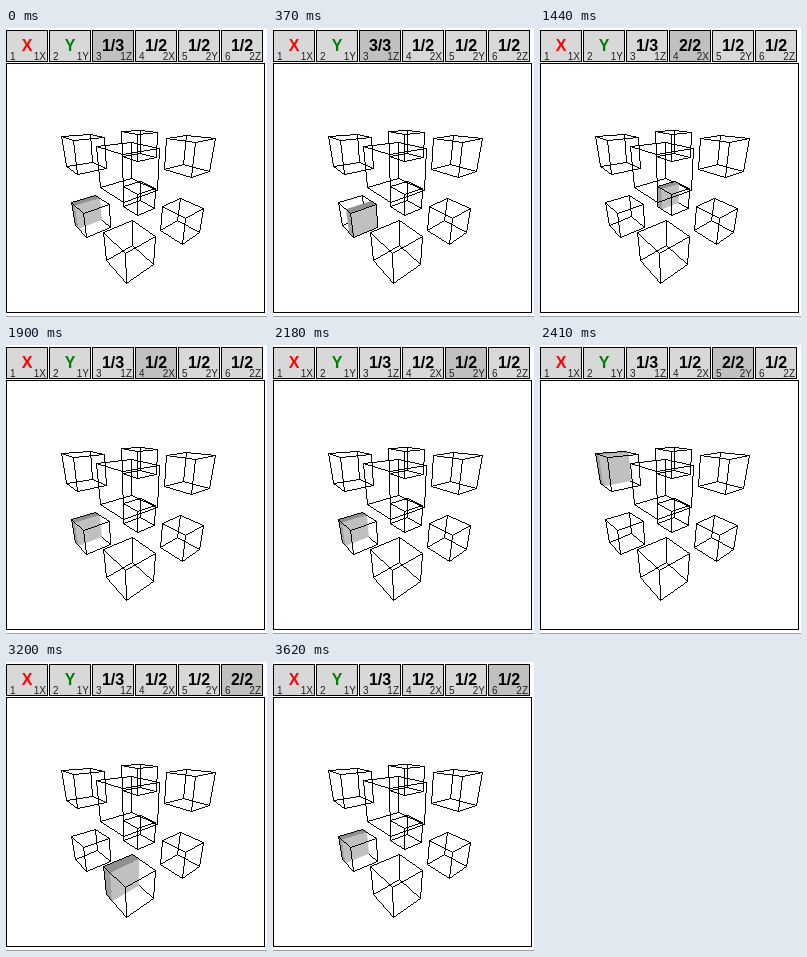
Animation, 261 px wide and 289 px high, one loop 3760 ms. Source, as an HTML page with a canvas:

```html
<!DOCTYPE html>
<html lang="en">
<head>
<meta charset="utf-8">
<style>
  html, body { margin: 0; width: 100%; height: 100%; overflow: hidden; background: #fff; }
  canvas, svg { position: absolute; left: 0; top: 0; width: 261px; height: 289px; }
  text { font-family: Arial, "Liberation Sans", sans-serif; }
  .main { font-size: 16px; font-weight: bold; text-anchor: middle; }
  .small { font-size: 10px; fill: #222; }
  .end { text-anchor: end; }
</style>
</head>
<body>
<canvas width="261" height="289"></canvas>
<svg viewBox="0 0 261 289"></svg>
<script>
const LOOP = 3760;
// time, active button, slice, block offset on each axis
const STEPS = [
  [0, 2, 0, 0, 0, 0], [190, 2, 1, 0, 0, 0], [370, 2, 2, 0, 0, 0],
  [780, 2, 1, 0, 0, 0], [960, 2, 0, 0, 0, 0], [1250, 3, 0, 0, 0, 0],
  [1440, 3, 0, 1, 0, 0], [1900, 3, 0, 0, 0, 0], [2180, 4, 0, 0, 0, 0],
  [2410, 4, 0, 0, 1, 0], [2780, 4, 0, 0, 0, 0], [3070, 5, 0, 0, 0, 0],
  [3200, 5, 0, 0, 0, 1], [3620, 5, 0, 0, 0, 0]
];
const LABELS = ['1X', '1Y', '1Z', '2X', '2Y', '2Z'];
const ctx = document.querySelector('canvas').getContext('2d');
const svg = document.querySelector('svg');

function add(tag, attrs, text = '') {
  const el = document.createElementNS('http://www.w3.org/2000/svg', tag);
  for (const key in attrs) el.setAttribute(key, attrs[key]);
  el.textContent = text;
  return svg.appendChild(el);
}

const buttons = LABELS.map((label, i) => {
  const x = i * 43;
  const box = add('rect', { x: x + .5, y: 2.5, width: 41, height: 31, stroke: '#000' });
  const value = add('text', { x: x + 21, y: 23, class: 'main', fill: ['#f00', '#008000'][i] || '#000' }, 'XY'[i]);
  add('text', { x: x + 4, y: 32, class: 'small' }, i + 1);
  add('text', { x: x + 40, y: 32, class: 'small end' }, label);
  return { box, value };
});
add('rect', { x: .5, y: 35.5, width: 258, height: 249, fill: 'none', stroke: '#000' });
add('rect', { x: 0, y: 288, width: 261, height: 1, fill: '#a0a0a0' });

// camera
const AZ = .685, PITCH = .4, DIST = 5.25, FOCAL = 180, HALF = .425;

function project(x, y, z) {
  const right = x * Math.cos(AZ) + z * Math.sin(AZ);
  const near = z * Math.cos(AZ) - x * Math.sin(AZ);
  const up = y * Math.cos(PITCH) - near * Math.sin(PITCH);
  const k = FOCAL / (DIST - near * Math.cos(PITCH) - y * Math.sin(PITCH));
  return [129.3 + right * k, 160 - up * k];
}

// p runs from 0 to 1 inside the block
const corner = (block, p) => project(...p.map((v, i) => block[i] * 2 - 1 + (v * 2 - 1) * HALF));

function line(a, b) {
  const [x, y] = a.map(Math.floor);
  const dx = Math.floor(b[0]) - x, dy = Math.floor(b[1]) - y;
  const n = Math.max(Math.abs(dx), Math.abs(dy));
  for (let i = 0; i <= n; i++) {
    ctx.fillRect(Math.round(x + dx * i / n), Math.round(y + dy * i / n), 1, 1);
  }
}

function face(block, color, points) {
  ctx.fillStyle = color;
  ctx.beginPath();
  points.forEach(p => ctx.lineTo(...corner(block, p)));
  ctx.fill();
}

function slab(block, slice) {
  const a = slice / 3, b = a + 1 / 3;
  face(block, '#c0c0c0', [[0, 0, b], [1, 0, b], [1, 1, b], [0, 1, b]]);
  face(block, '#a0a0a0', [[0, 0, a], [0, 0, b], [0, 1, b], [0, 1, a]]);
  face(block, '#909090', [[0, 1, a], [1, 1, a], [1, 1, b], [0, 1, b]]);
}

const bits = n => [n & 1, n >> 1 & 1, n >> 2];
const BACK = 1; // farthest corner: x = 1, y = 0, z = 0

function edges(block, hidden) {
  ctx.fillStyle = '#000';
  for (let n = 0; n < 8; n++) {
    for (const bit of [1, 2, 4]) {
      const m = n | bit;
      if (m !== n && (n === BACK || m === BACK) === hidden) {
        line(corner(block, bits(n)), corner(block, bits(m)));
      }
    }
  }
}

function draw([, active, slice, ...block]) {
  buttons.forEach(({ box, value }, i) => {
    box.setAttribute('fill', i === active ? '#c0c0c0' : '#d8d8d8');
    if (i === 2) value.textContent = `${slice + 1}/3`;
    if (i > 2) value.textContent = `${block[i - 3] + 1}/2`;
  });
  ctx.clearRect(0, 0, 261, 289);
  const blocks = Array.from({ length: 8 }, (_, n) => bits(n));
  blocks.forEach(b => edges(b, true));
  slab(block, slice);
  blocks.forEach(b => edges(b, false));
}

const start = performance.now();
let shown;
function tick() {
  const t = (performance.now() - start) % LOOP;
  const step = STEPS.findLast(s => s[0] <= t);
  if (step !== shown) draw(shown = step);
  requestAnimationFrame(tick);
}
tick();
</script>
</body>
</html>
```
